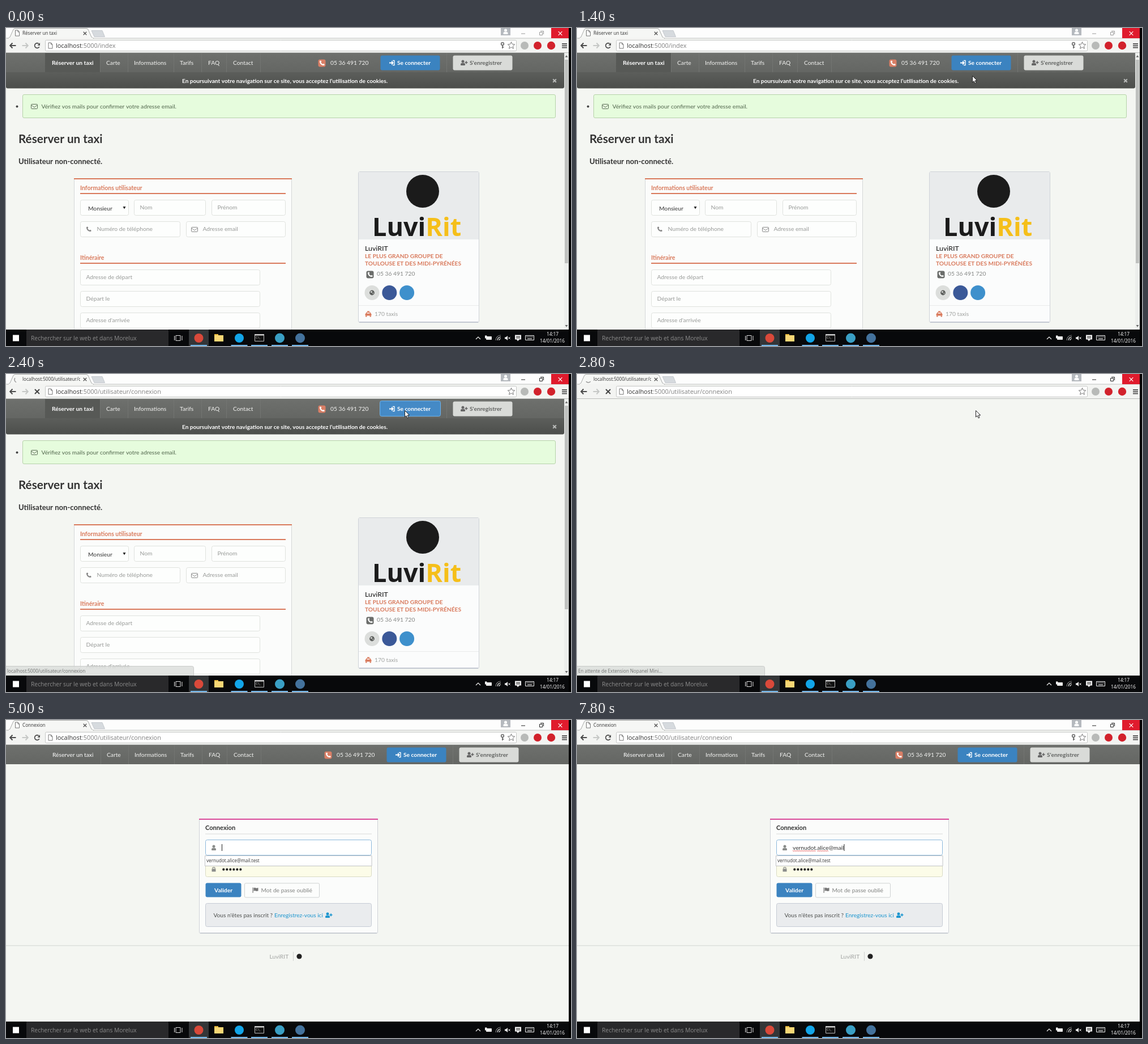
An HTML page with a canvas for the animation above (8 s loop, 998 by 561 pixels).

```html
<!DOCTYPE html>
<html lang="fr">
<head>
<meta charset="utf-8">
<title>Réserver un taxi</title>
<style>
html, body { margin: 0; width: 100%; height: 100%; overflow: hidden; background: #000; }
canvas { display: block; }
</style>
</head>
<body>
<canvas id="stage" width="998" height="561"></canvas>
<script>
const c = document.getElementById('stage').getContext('2d');
const LOOP = 8000, STEP = 200;
const LATO = 'Lato, sans-serif', UI = '"Open Sans", sans-serif';
const CORAL = '#d97a5c', BLUE = '#3b83c0', PAGE = '#f4f6f2';
const BRAND = 'LuviRIT', PHONE = '05 36 491 720', EMAIL = 'vernudot.alice@mail.test';
const URL_PATH = ':5000/utilisateur/connexion';

// Moments of the story, in ms
const HOVER = 1600, CLICK = 1800, NAVIGATE = 2000, BLANK = 2600, LOADED = 3200;
const FOCUS = 3800, SUGGEST = 4000, CARET_OFF = 4400, TYPE = 5000;

// [time, x, y]
const POINTER = [[400, 790, 480], [600, 690, 300], [800, 648, 211], [1000, 653, 190],
  [1400, 698, 84], [1600, 704, 64], [3200, 704, 64], [3600, 545, 222], [3800, 541, 226]];
// [time, characters in the field]
const TYPED = [[5000, 0], [5200, 1], [6000, 9], [6200, 12], [7000, 15], [7800, 19]];

function lerpKeys(keys, t, i) {
  const n = keys.findIndex(k => k[0] > t);
  if (n < 0) return keys[keys.length - 1][i];
  if (n === 0) return keys[0][i];
  const a = keys[n - 1], b = keys[n];
  return a[i] + (b[i] - a[i]) * (t - a[0]) / (b[0] - a[0]);
}

function rect(x, y, w, h, fill) {
  c.fillStyle = fill;
  c.fillRect(x, y, w, h);
}

function box(x, y, w, h, fill, border, r = 2.5) {
  c.beginPath();
  c.roundRect(x + .5, y + .5, w - 1, h - 1, r);
  if (fill) { c.fillStyle = fill; c.fill(); }
  if (border) { c.strokeStyle = border; c.lineWidth = 1; c.stroke(); }
}

function disc(x, y, r, fill) {
  c.beginPath();
  c.arc(x, y, r, 0, 7);
  c.fillStyle = fill;
  c.fill();
}

function ring(x, y, r, color, w = 1, from = 0, to = 2 * Math.PI) {
  c.beginPath();
  c.arc(x, y, r, from, to);
  c.strokeStyle = color;
  c.lineWidth = w;
  c.stroke();
}

// Polyline from a flat list of coordinates
function line(pts, color, w = 1, fill) {
  c.beginPath();
  for (let i = 0; i < pts.length; i += 2) c.lineTo(pts[i], pts[i + 1]);
  if (fill) { c.closePath(); c.fillStyle = fill; c.fill(); }
  if (color) { c.strokeStyle = color; c.lineWidth = w; c.stroke(); }
}

// Text centred vertically on y; returns its width
function text(s, x, y, color, { size = 10.25, weight = 400, font = LATO, align = 'left' } = {}) {
  c.font = `${weight} ${size}px ${font}`;
  c.textAlign = align;
  c.fillStyle = color;
  c.fillText(s, x, y + size * .37);
  return c.measureText(s).width;
}
const bold = (s, x, y, color, size = 10.25, align = 'left') => text(s, x, y, color, { size, weight: 700, align });
const ui = (s, x, y, color, size, align = 'left') => text(s, x, y, color, { size, font: UI, align });

function handset(x, y, color) {
  ring(x + 3, y - 3, 6, color, 2, 1.4, 3.3);
  disc(x + 3, y + 2.4, 1.5, color);
  disc(x - 2.4, y - 3, 1.5, color);
}

function phoneSquare(x, y, color) {
  box(x - 7, y - 7, 14, 14, color, null, 3);
  handset(x, y, '#fff');
}

function envelope(x, y, color) {
  box(x - 6, y - 4, 12, 9, null, color, 1);
  line([x - 5, y - 2, x, y + 2, x + 5, y - 2], color);
}

function person(x, y, color, plus) {
  disc(x, y - 2.4, 2.5, color);
  c.beginPath();
  c.roundRect(x - 4, y + .3, 8, 4.2, [2.5, 2.5, 1, 1]);
  c.fill();
  if (plus) {
    rect(x + 3.5, y - 1.5, 5, 1.6, color);
    rect(x + 5.2, y - 3.2, 1.6, 5, color);
  }
}

function globe(x, y, color, land) {
  disc(x, y, 4.4, color);
  line([x - 3, y - 2, x, y - 3, x + .5, y - 1, x - 1.5, y + .5], null, 0, land);
  line([x + 1, y + .5, x + 3, y, x + 1.5, y + 3], null, 0, land);
}

function loginIcon(x, y) {
  line([x - 4, y - 1, x, y - 1, x, y - 4, x + 4, y, x, y + 4, x, y + 1, x - 4, y + 1], null, 0, '#fff');
  line([x + 2, y - 4, x + 5, y - 4, x + 5, y + 4, x + 2, y + 4], '#fff', 1.3);
}

function taxi(x, y, color) {
  rect(x - 2, y - 5, 4, 2, color);
  line([x - 3.5, y - 3, x + 3.5, y - 3, x + 5, y, x - 5, y], null, 0, color);
  box(x - 6, y - 1, 12, 4.5, color, null, 1);
  rect(x - 5, y + 3, 2.5, 2, color);
  rect(x + 2.5, y + 3, 2.5, 2, color);
  rect(x - 2.5, y - 2, 5, 1.3, '#fff');
}

function cross(x, y, r, color, w) {
  line([x - r, y - r, x + r, y + r], color, w);
  line([x - r, y + r, x + r, y - r], color, w);
}

function pageIcon(x, y) {
  line([x - 3.5, y - 5, x + 1, y - 5, x + 3.5, y - 2, x + 3.5, y + 5, x - 3.5, y + 5, x - 3.5, y - 5], '#777', 1, '#fff');
  line([x + 1, y - 5, x + 1, y - 2, x + 3.5, y - 2], '#777');
}

function star(x, y) {
  const pts = [];
  for (let i = 0; i <= 10; i++) {
    const a = i * Math.PI / 5 - Math.PI / 2, r = i % 2 ? 3 : 6.5;
    pts.push(x + r * Math.cos(a), y + r * Math.sin(a));
  }
  line(pts, '#777', 1, '#fff');
}

function browser(t) {
  const active = t >= CLICK, loading = t >= NAVIGATE && t < LOADED;
  rect(0, 0, 994, 18, '#fdfdfd');
  rect(0, 18, 994, 26, '#f3f4f2');
  rect(0, 17.5, 994, 1, '#c0c2c0');
  line([151, 4.5, 170, 4.5, 174.5, 15.5, 156, 15.5, 151, 4.5], '#c5c9ce', 1, '#d6dade');
  line([3, 18.5, 7, 16, 13, 2.5, 16, .5, 142, .5, 145, 2.5, 151, 16, 155, 18.5], '#a9aba9', 1, '#f6f7f5');
  rect(4, 17.5, 150, 2, '#f3f4f2');

  if (loading) {
    const mid = (200 - (t - 2200) * 110 / 600) * Math.PI / 180;
    ring(20, 10, 5, '#999', 1.5, mid - .9, mid + .9);
  } else pageIcon(20, 9);
  c.save();
  c.beginPath();
  c.rect(28, 0, 103, 18);
  c.clip();
  const title = t < NAVIGATE ? 'Réserver un taxi' : loading ? 'localhost' + URL_PATH : 'Connexion';
  ui(title, 29, 9, '#333', 8.15);
  c.restore();
  cross(139.5, 9.5, 2.8, '#555', 1.3);

  rect(874, 0, 17, 13, '#b5b9be');
  person(882.5, 6.5, '#fff');
  const winColor = active ? '#222' : '#999';
  rect(910, 9.5, 7, 1, winColor);
  line([942.5, 7.5, 947.5, 7.5, 947.5, 12.5, 942.5, 12.5, 942.5, 7.5], winColor);
  line([944, 5.5, 949.5, 5.5, 949.5, 11], winColor);
  rect(963, 0, 31, 18, '#e01b2d');
  cross(979, 9.5, 3.3, '#fff', 1.2);

  const arrow = (x, d, color) => {
    line([x - 5 * d, 31, x + 5 * d, 31], color, 2);
    line([x + d, 26.5, x + 5.3 * d, 31, x + d, 35.5], color, 2);
  };
  arrow(12.5, -1, '#4a4a4a');
  arrow(33.5, 1, '#c6c8c6');
  if (loading) cross(55, 31, 4, '#444', 2);
  else {
    ring(55, 31, 4.3, '#4a4a4a', 1.8, .5, 5.4);
    line([60, 26, 60, 31, 55.5, 30.5], null, 0, '#4a4a4a');
  }
  box(69, 21, 833, 20, '#fff', '#c4c6c4', 2);
  pageIcon(78.5, 31);
  const w = ui('localhost', 88, 31, '#333', 10.93);
  ui(t < NAVIGATE ? ':5000/index' : URL_PATH, 88 + w, 31, '#808080', 10.93);
  if (!loading) {
    ring(877, 28, 2.3, '#777', 1.8);
    rect(876, 30, 2, 6, '#777');
    rect(878, 33, 1.5, 1.5, '#777');
  }
  star(892.5, 31);
  disc(916, 31, 7, '#b8bab8');
  disc(939, 31, 7, '#d2222c');
  disc(963, 31, 7.2, '#d2222c');
  for (const y of [27, 30.3, 33.6]) rect(982, y, 9, 1.9, '#555');
  rect(0, 43, 994, 1, '#b9bbb9');
}

function nav(shift, width, first, hover) {
  const g = c.createLinearGradient(0, 44, 0, 78);
  g.addColorStop(0, '#6e706d');
  g.addColorStop(1, '#646663');
  rect(0, 44, width, 34, g);
  const o = first ? 0 : 1;
  if (first) rect(69, 44, 97, 34, '#575956');
  text('Réserver un taxi', 81 + o, 61, '#fff', { weight: first ? 700 : 400 });
  [['Carte', 177], ['Informations', 226], ['Tarifs', 307], ['FAQ', 357], ['Contact', 401]]
    .forEach(([s, x]) => text(s, x + o, 61, '#f4f4f2'));
  for (const x of [166, 215, 296, 345, 389, 449]) rect(x + o, 44, 1, 34, '#737572');
  phoneSquare(558 + shift, 62, '#d97f66');
  text(PHONE, 573 + shift, 61, '#f4f4f2');
  if (hover) box(660 + shift, 47, 108, 28, '#458ac6', '#6fb3ea', 3);
  else box(661 + shift, 48, 106, 27, BLUE, null, 3);
  loginIcon(681 + shift, 61.5);
  bold('Se connecter', 691 + shift, 61, '#fff', 10.2);
  rect(778 + shift, 44, 1, 34, '#737572');
  box(789 + shift, 48, 106, 27, '#d9dbd8', null, 3);
  person(807 + shift, 61.5, '#666', true);
  bold("S'enregistrer", 819 + shift, 61, '#636563', 10.2);
}

function field(x, y, w, label, dx = 10.5) {
  box(x, y, w, 28, '#fdfefd', '#dfe2de', 3);
  text(label, x + dx, y + 13.5, '#989a98');
}

function heading(s, y) {
  bold(s, 131, y, CORAL, 10.5);
  rect(131, y + 9, 363, 2, CORAL);
}

function booking(hover) {
  rect(0, 44, 994, 488, PAGE);
  nav(0, 986, true, hover);
  const g = c.createLinearGradient(0, 78, 0, 107);
  g.addColorStop(0, '#5c5e5b');
  g.addColorStop(1, '#4c4e4b');
  c.fillStyle = g;
  c.beginPath();
  c.roundRect(0, 78, 986, 28.5, [0, 0, 3, 3]);
  c.fill();
  bold('En poursuivant votre navigation sur ce site, vous acceptez l’utilisation de cookies.', 492.5, 93, '#fff', 10.12, 'center');
  cross(969, 93, 2.8, '#b8bab8', 2);

  disc(19.5, 138.5, 2, '#444');
  box(29, 117, 942, 42, '#e6fcdd', '#b7d2aa');
  envelope(50, 138, '#5a6a56');
  text('Vérifiez vos mails pour confirmer votre adresse email.', 62.5, 138, '#52664d');
  bold('Réserver un taxi', 22, 195, '#333', 20.7);
  bold('Utilisateur non-connecté.', 22, 235, '#333', 13.1);

  box(120, 265, 385, 290, '#fbfcfb', '#d5d8d8');
  rect(120, 265, 385, 2, CORAL);
  heading('Informations utilisateur', 282);
  field(131, 303, 86, '');
  text('Monsieur', 145, 318, '#333');
  line([206.5, 315, 211.5, 315, 209, 319.5], null, 0, '#222');
  field(226, 303, 127, 'Nom');
  field(363, 303, 131, 'Prénom');
  field(131, 341, 177, 'Numéro de téléphone', 29.5);
  handset(146, 355, '#888');
  field(318, 341, 176, 'Adresse email', 29.5);
  envelope(333, 355, '#888');
  heading('Itinéraire', 405);
  field(131, 426, 318, 'Adresse de départ');
  field(131, 464, 318, 'Départ le');
  field(131, 502, 318, "Adresse d'arrivée");

  card();
  rect(986, 44, 8, 488, '#eceeec');
  rect(987, 56, 6, 359, '#bfc1bf');
  line([987.5, 51.5, 990, 48, 992.5, 51.5], null, 0, '#666');
  line([987.5, 524, 990, 527.5, 992.5, 524], null, 0, '#666');
}

function card() {
  box(622, 253, 214, 267, '#fbfcfc', '#cfd3d8');
  rect(624, 518, 210, 2, '#c3c8d2');
  rect(623, 254, 212, 119, '#e9ebec');
  disc(736, 288, 29, '#1b1b1b');
  const logo = { size: 45, weight: 700, font: UI };
  const w = text('Luvi', 647, 350.5, '#1b1b1b', logo);
  text('Rit', 647 + w, 350.5, '#f5bf1a', logo);
  text(BRAND, 634, 388.5, '#222', { size: 12.3, weight: 500 });
  bold('LE PLUS GRAND GROUPE DE', 634, 402, CORAL, 10.2);
  bold('TOULOUSE ET DES MIDI-PYRÉNÉES', 634, 415, CORAL, 10.2);
  phoneSquare(643, 435, '#6b6d6b');
  text(PHONE, 655, 433.5, '#858785');
  ['#dcdedc', '#3b5998', '#3e90cc'].forEach((col, i) => disc(646.5 + 30.8 * i, 467, 13, col));
  globe(646.5, 467, '#5d5f5d', '#dcdedc');
  rect(623, 489, 212, 1, '#e9ebea');
  taxi(640, 504.5, CORAL);
  text('170 taxis', 651, 504, '#a0a2a0');
}

function squiggle(x, w) {
  const pts = [];
  for (let i = 0; i <= w; i += 1.5) pts.push(x + i, 231 + (i / 1.5 % 2 ? .8 : -.8));
  line(pts, '#e04848', .9);
}

function login(t) {
  rect(0, 44, 994, 488, PAGE);
  nav(11, 994, false, false);
  box(341, 174, 316, 203, '#fbfcfb', '#cfd3d8');
  rect(343, 375, 312, 1.5, '#c9cdd4');
  rect(341, 174, 316, 2, '#d9499a');
  bold('Connexion', 352, 190, '#333', 11.1);
  rect(352, 200.5, 294, 1, '#dadcda');

  const edited = t >= TYPE, focused = t >= FOCUS;
  box(352, 211, 294, 28, edited ? '#fff' : '#fdfde4', edited ? '#8ab8dc' : focused ? '#cbc980' : '#dcdcc0', 3);
  person(367, 225.5, '#8b8d8b');
  const typed = EMAIL.slice(0, edited ? Math.round(lerpKeys(TYPED, t, 1)) : EMAIL.length);
  const w = text(typed, 381, 225, '#333');
  if (edited) {
    const width = s => c.measureText(s).width;
    const [first, second] = EMAIL.split(/[.@]/);
    squiggle(381, Math.min(w, width(first)));
    if (typed.includes('@')) squiggle(381 + width(first + '.'), width(second));
  }
  if (focused && (t < CARET_OFF || edited)) rect(381 + w, 219, 1, 12, '#222');

  box(352, 249, 294, 28, '#fcfce8', '#d9dac4', 3);
  rect(363.5, 262.5, 7, 5, '#8b8d8b');
  ring(367, 262, 2.2, '#8b8d8b', 1.3, Math.PI, 2 * Math.PI);
  for (let i = 0; i < 6; i++) disc(384.3 + 6 * i, 263.7, 2.1, '#222');
  if (t >= SUGGEST) {
    box(351, 239, 295.5, 19, '#fff', '#c2c4c6', 0);
    ui(EMAIL, 354, 248, '#333', 8.15);
  }

  box(352, 287, 64, 26, BLUE, null, 3);
  bold('Valider', 384, 300, '#fff', 10.3, 'center');
  box(421, 287.5, 133, 26, '#fcfdfc', '#cfd2d2', 2);
  rect(435.5, 295.5, 1.2, 9.5, '#777');
  line([437.5, 296, 440, 295.7, 442, 296.8, 445.5, 296, 445.5, 301.5, 442, 302, 440, 301, 437.5, 301.7], null, 0, '#777');
  text('Mot de passe oublié', 450.5, 300, '#808280');
  box(352, 323, 294, 42, '#eaecee', '#c6cbd5', 3);
  text("Vous n'êtes pas inscrit ?", 366.5, 344, '#4c4e4c', { size: 10.1 });
  text('Enregistrez-vous ici', 474, 344, '#1c96cf', { size: 10.1 });
  person(568, 344.5, '#1c96cf', true);

  rect(0, 397.5, 994, 1, '#d2d5d2');
  text(BRAND, 465.5, 417, '#a2a4a2');
  rect(507, 409, 1, 16, '#d0d3d0');
  disc(518, 417, 4.6, '#222');
}

function status(s) {
  c.globalAlpha = .85;
  c.beginPath();
  c.roundRect(-1, 515.5, 332.5, 20, [0, 3, 0, 0]);
  c.fillStyle = '#dcdedc';
  c.fill();
  c.strokeStyle = '#c3c5c3';
  c.lineWidth = 1;
  c.stroke();
  c.globalAlpha = 1;
  ui(s, 2, 524, '#6f716f', 8.15);
}

function taskbar() {
  rect(0, 532, 998, 29, '#08090b');
  rect(12, 541.5, 11, 11, '#fff');
  rect(36, 532, 251, 29, '#29292b');
  ui('Rechercher sur le web et dans Morelux', 44, 547, '#8c8c8c', 10.3);
  box(299.5, 542, 9, 10, null, '#ddd', 0);
  line([297.5, 543, 297.5, 551], '#ddd');
  line([311, 543, 311, 551], '#ddd');
  rect(323, 532, 35, 29, '#343638');
  disc(340.5, 547, 8, '#d9493a');
  rect(368, 540, 7, 3, '#e9b93c');
  rect(368, 542, 16, 11, '#f8d775');
  disc(412, 547, 8, '#12a5e8');
  box(439, 540, 17, 13, '#111', '#bbb', 0);
  rect(439, 540, 17, 2.5, '#ccc');
  ui('C:\\_', 441, 546, '#ddd', 5);
  disc(483.5, 547, 8.5, '#3a9fc4');
  disc(519.5, 547, 8.5, '#44729c');
  for (const x of [326, 397.5, 433, 469, 505]) rect(x, 559, 29, 2, '#76b9ed');

  const white = '#eee';
  line([830, 549, 834, 545, 838, 549], white, 1.2);
  box(848, 544, 10, 6, white, white, 0);
  rect(846, 542.5, 3.5, 5, white);
  for (const r of [3, 6, 9]) ring(874, 551, r, r > 6 ? '#888' : white, 1.2, Math.PI, 1.5 * Math.PI);
  line([881, 545.5, 883, 545.5, 886, 543, 886, 551, 883, 548.5, 881, 548.5], null, 0, white);
  cross(889, 547, 1.7, white, 1);
  rect(899, 541.5, 11, 8, white);
  line([902, 549, 907, 549, 904, 552.5], null, 0, white);
  rect(901, 544, 7, 1, '#222');
  rect(901, 546.3, 7, 1, '#222');
  box(917, 542, 16, 9, null, white, 0);
  for (let i = 0; i < 5; i++) rect(919.3 + 2.5 * i, 544, 1.3, 1.3, white);
  rect(921, 547.5, 8, 1.2, white);
  ui('14:17', 965.5, 539.5, '#fff', 8.3, 'center');
  ui('14/01/2016', 965, 552, '#fff', 8.3, 'center');
}

function pointer(t) {
  if (t < POINTER[0][0] || t >= SUGGEST) return;
  c.save();
  c.translate(lerpKeys(POINTER, t, 1) + .5, lerpKeys(POINTER, t, 2) + .5);
  line([0, 0, 0, 11.5, 2.7, 9, 4.6, 13.3, 6.5, 12.4, 4.7, 8.3, 8.2, 8.2, 0, 0], '#222', 1, '#fff');
  c.restore();
}

function draw(t) {
  rect(0, 0, 998, 561, '#000');
  if (t < BLANK) booking(t >= HOVER);
  else if (t < LOADED) rect(0, 44, 994, 488, PAGE);
  else login(t);
  browser(t);
  if (t >= HOVER && t < BLANK) status('localhost' + URL_PATH);
  else if (t >= BLANK && t < LOADED) status('En attente de Extension Nopanel Mini...');
  taskbar();
  rect(994, 0, 4, 561, '#000');
  pointer(t);
}

const start = performance.now();
function tick() {
  const t = (performance.now() - start) % LOOP;
  draw(Math.floor(t / STEP) * STEP);
  requestAnimationFrame(tick);
}
tick();
</script>
</body>
</html>
```
